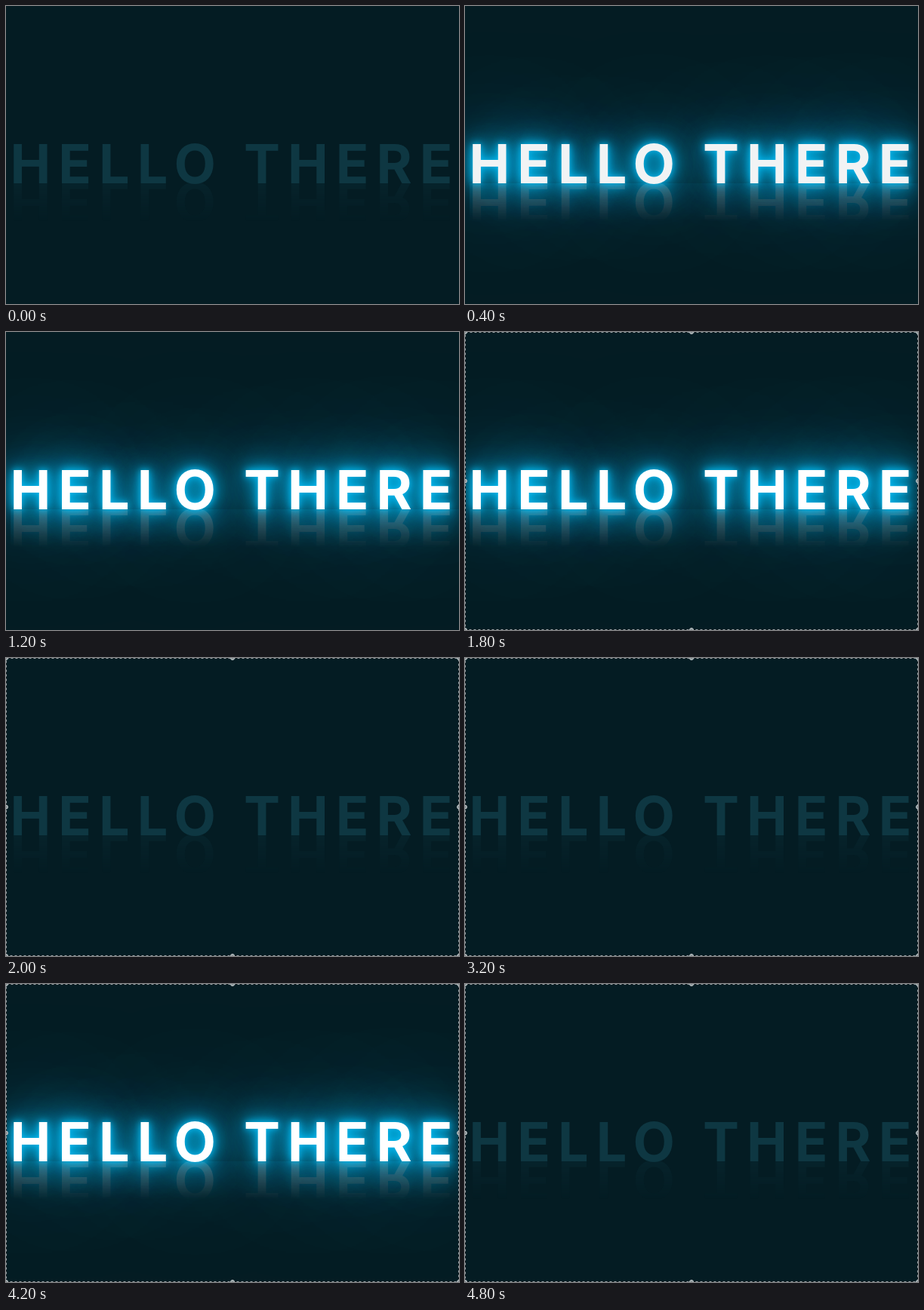
An HTML page that plays this animation: 600x395 px, repeating every 5000 ms.

```html
<!DOCTYPE html>
<html lang="en">
<head>
<meta charset="utf-8">
<title>Hello there</title>
<style>
  html, body { margin: 0; width: 100%; height: 100%; overflow: hidden; background: #041c23; }
  h2 {
    position: absolute; left: 5.5px; top: 183.6px; margin: 0;
    font: 700 72px/.7 Inter, sans-serif;
    letter-spacing: 10px; white-space: nowrap; color: #0e3742;
    -webkit-box-reflect: below 1px linear-gradient(transparent, #0004);
  }
  svg { position: absolute; left: 0; top: 0; opacity: 0; }
</style>
</head>
<body>
<h2 id="sign">HELLO THERE</h2>
<svg id="frame" width="600" height="395" fill="none">
  <rect x=".5" y=".5" width="599" height="394" stroke="#10181c"/>
  <rect x=".5" y=".5" width="599" height="394" stroke="#98a4a8" stroke-dasharray="3 3"/>
  <g id="grips" fill="#8f999d" stroke="#c3cacc"></g>
</svg>
<script>
const LOOP = 5000;
const OFF = [14, 55, 66];

// [start in ms, lamp level]
const lamp = [
  [0, 0], [400, .94], [600, 1], [2000, 0], [2400, .94], [2600, 1], [2800, 0],
  [3400, .94], [3600, 1], [4000, .94], [4200, 1], [4400, 0], [LOOP, 0]
];
const outline = [[0, 0], [1800, 1], [LOOP, 1]];

function lit(level) {
  const rgb = OFF.map(c => Math.round(c + (255 - c) * level));
  const glow = [10, 20, 40, 80, 160].map(r => `0 0 ${r * level}px rgba(3,188,244,${level})`);
  return { color: `rgb(${rgb})`, textShadow: level ? glow.join() : 'none' };
}

function play(el, steps, style) {
  const frames = steps.map(([t, v]) => ({ offset: t / LOOP, easing: 'step-end', ...style(v) }));
  return el.animate(frames, { duration: LOOP, iterations: Infinity });
}

const grips = document.getElementById('grips');
for (const x of [0, 300, 600]) for (const y of [0, 197.5, 395]) {
  if (x === 300 && y === 197.5) continue;
  const dot = document.createElementNS('http://www.w3.org/2000/svg', 'circle');
  for (const [k, v] of Object.entries({ cx: x, cy: y, r: 2.5 })) dot.setAttribute(k, v);
  grips.append(dot);
}

play(document.getElementById('sign'), lamp, lit);
play(document.getElementById('frame'), outline, v => ({ opacity: v }));
</script>
</body>
</html>
```
